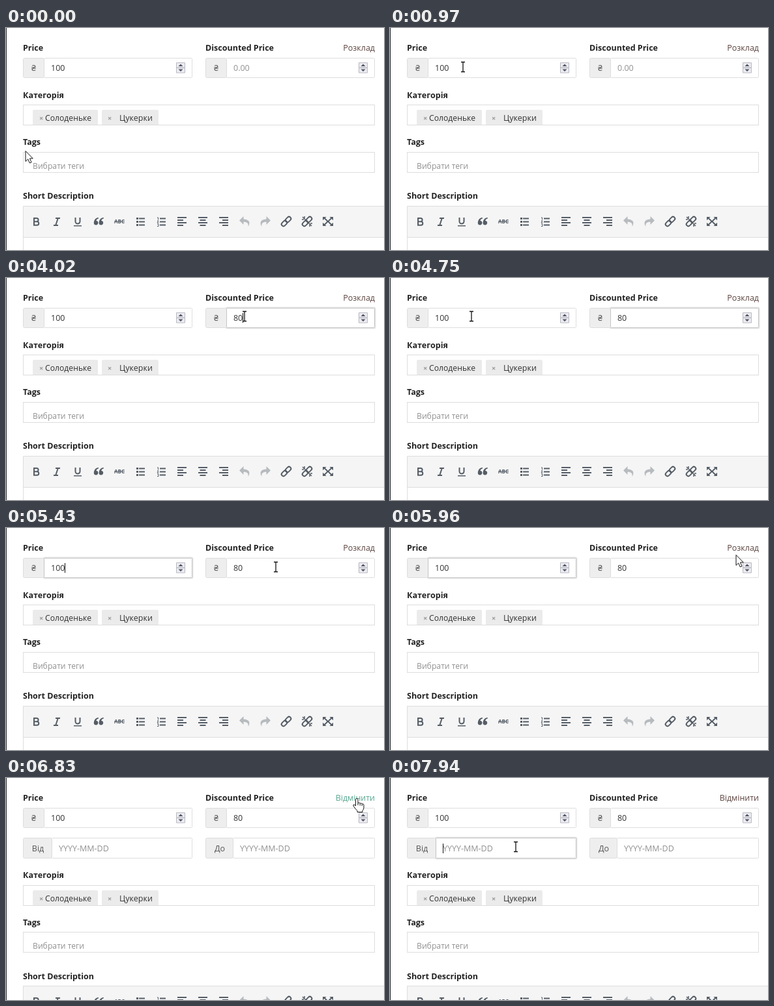
Recreate the animation shown at these times as an HTML page. Size 580 px wide and 342 px high, loop 8000 ms.

```html
<!DOCTYPE html>
<html lang="uk">
<head>
<meta charset="utf-8">
<title>Product price form</title>
<style>
html, body { margin: 0; width: 100%; height: 100%; overflow: hidden; background: #fff; }
svg { display: block; }
text { font: 12.5px "Open Sans", "Noto Sans", sans-serif; fill: #333; }
.label { font-weight: 700; fill: #222; }
.cyr { font-size: 12.2px; }
.hint { fill: #919191; }
.unit { fill: #555; text-anchor: middle; }
.link { text-anchor: end; fill: #5d4540; }
.x { font-size: 11px; font-weight: 700; fill: #999; }
.box { fill: #fff; stroke: #ddd; }
.addon { fill: #eee; stroke: #ddd; }
.glow { fill: none; stroke: #000; stroke-width: 4; stroke-opacity: .1; }
.ring { fill: none; stroke: #c4c4c4; }
.caret { fill: #111; }
.icon { fill: #555d66; }
.line { fill: none; stroke: #555d66; stroke-width: 2; }
.off { opacity: .38; }

/* every change is a hard cut on one 8 s clock */
.t { animation: 8s step-end infinite; }
.move { animation-name: move; }
.arrow { animation-name: arrow; }
.beam { animation-name: beam; }
.hand { animation-name: hand; }
.click { animation-name: click; }
.focus-price { animation-name: focus-price; }
.focus-sale { animation-name: focus-sale; }
.focus-from { animation-name: focus-from; }
.caret-price { animation-name: caret-price; }
.caret-sale { animation-name: caret-sale; }
.empty { animation-name: empty; }
.one { animation-name: one; }
.two { animation-name: two; }
.closed { animation-name: closed; }
.open { animation-name: open; }
.link.t { animation-name: link; }
.drop46 { animation-name: drop46; }
.drop47 { animation-name: drop47; }

@keyframes move {
  0% { transform: translate(30px, 190px); }
  5.125% { transform: translate(36px, 176px); }
  6.875% { transform: translate(50px, 143px); }
  8.625% { transform: translate(69px, 110px); }
  10.375% { transform: translate(90px, 83px); }
  12.125% { transform: translate(112px, 60px); }
  17.125% { transform: translate(160px, 60px); }
  18.875% { transform: translate(292px, 61px); }
  20.625% { transform: translate(352px, 60px); }
  22.375% { transform: translate(366px, 59px); }
  57.625% { transform: translate(230px, 59px); }
  59.375% { transform: translate(125px, 59px); }
  66.375% { transform: translate(255px, 60px); }
  67.875% { transform: translate(414px, 60px); }
  69.625% { transform: translate(463px, 60px); }
  71.25% { transform: translate(498px, 58px); }
  72.875% { transform: translate(520px, 52px); }
  74.5% { transform: translate(531px, 42px); }
  76.125% { transform: translate(536px, 35px); }
  77.875% { transform: translate(538px, 32px); }
  92.375% { transform: translate(462px, 54px); }
  94.125% { transform: translate(325px, 82px); }
  95.875% { transform: translate(232px, 102px); }
  97.5%, 100% { transform: translate(193px, 106px); }
}
@keyframes arrow {
  0%, 18.875%, 74.5%, 94.125% { opacity: 1; }
  12.125%, 20.625%, 76.125%, 95.875%, 100% { opacity: 0; }
}
@keyframes beam {
  0%, 18.875%, 74.5%, 94.125% { opacity: 0; }
  12.125%, 20.625%, 92.375%, 95.875%, 100% { opacity: 1; }
}
@keyframes hand {
  0%, 92.375%, 100% { opacity: 0; }
  76.125% { opacity: 1; }
}
@keyframes click {
  0%, 30.125%, 100% { opacity: 0; }
  28.25% { opacity: 1; }
}
@keyframes focus-sale {
  0%, 63%, 100% { opacity: 0; }
  30.125% { opacity: 1; }
}
@keyframes focus-price {
  0%, 83.625%, 100% { opacity: 0; }
  63% { opacity: 1; }
  81.75% { opacity: .4; }
}
@keyframes focus-from {
  0% { opacity: 0; }
  99.25%, 100% { opacity: 1; }
}
@keyframes caret-price {
  0%, 69.625%, 81.75%, 100% { opacity: 0; }
  63%, 76.125% { opacity: 1; }
}
@keyframes caret-sale {
  0%, 36.625%, 57.625%, 100% { opacity: 0; transform: none; }
  30.125%, 43.625% { opacity: 1; transform: none; }
  48.625% { opacity: 1; transform: translate(7px, 0); }
  50.25% { opacity: 1; transform: translate(14px, 0); }
}
@keyframes empty {
  0% { opacity: 1; }
  48.625%, 100% { opacity: 0; }
}
@keyframes one {
  0% { opacity: 0; }
  48.625%, 100% { opacity: 1; }
}
@keyframes two {
  0% { opacity: 0; }
  50.25%, 100% { opacity: 1; }
}
@keyframes closed {
  0% { opacity: 1; }
  85.375%, 100% { opacity: 0; }
}
@keyframes open {
  0% { opacity: 0; }
  85.375%, 100% { opacity: 1; }
}
@keyframes link {
  0%, 92.375%, 100% { fill: #5d4540; }
  76.125% { fill: #58a890; }
}
@keyframes drop46 {
  0% { transform: none; }
  85.375%, 100% { transform: translate(0, 46px); }
}
@keyframes drop47 {
  0% { transform: none; }
  85.375%, 100% { transform: translate(0, 47px); }
}
</style>
</head>
<body>
<svg width="580" height="342" viewBox="0 0 580 342">
  <defs>
    <g id="spin">
      <path d="M.5 .5h13v7.5h-13zM.5 8.5h13v7.5h-13z" fill="#ececf0" stroke="#b9b9c2"/>
      <path d="M3.5 6 7 2.5 10.500 6zM3.500 10.500h7L7 14z" fill="#4e5468"/>
    </g>
    <path id="quote" d="M142 292c-4.300 .4-7.200 3.800-7.200 8.300a3.300 3.300 0 1 0 3.600-3.400c.3-1.600 1.600-2.900 3.600-3.300z"/>
    <path id="undo" d="M358 296.500l6.500-6.500v4.500c8 0 11.500 5 7 11.500 1-5-1.500-7.200-7-7.200v4.200z"/>
    <g id="chain" transform="rotate(-45)">
      <rect x="-9" y="-3" width="9.500" height="6" rx="3"/>
      <rect x="-.5" y="-3" width="9.500" height="6" rx="3"/>
    </g>
    <path id="corner" d="M-8-7h5.500L-4.200-5.300-.5-1.700-2-.4-5.700-4-8-1.800z"/>
  </defs>

  <!-- prices -->
  <text class="label" x="26" y="35">Price</text>
  <text class="label" x="306" y="35">Discounted Price</text>
  <g class="t closed"><text class="link t" x="566" y="35">Розклад</text></g>
  <g class="t open"><text class="link t" x="566" y="35">Відмінити</text></g>

  <rect class="glow t focus-price" x="58.500" y="46.500" width="227" height="30" rx="1"/>
  <rect class="addon" x="26.500" y="46.500" width="32" height="30" rx="2"/>
  <rect class="box" x="58.500" y="46.500" width="227" height="30" rx="1"/>
  <rect class="ring t focus-price" x="58.500" y="46.500" width="227" height="30" rx="1"/>
  <text class="unit" x="42.500" y="66">₴</text>
  <text x="69" y="66">100</text>
  <rect class="caret t caret-price" x="90" y="54" width="1" height="15"/>
  <use href="#spin" x="261" y="53"/>

  <rect class="glow t focus-sale" x="338.500" y="46.500" width="227" height="30" rx="1"/>
  <rect class="addon" x="306.500" y="46.500" width="32" height="30" rx="2"/>
  <rect class="box" x="338.500" y="46.500" width="227" height="30" rx="1"/>
  <rect class="ring t focus-sale" x="338.500" y="46.500" width="227" height="30" rx="1"/>
  <text class="unit" x="322.500" y="66">₴</text>
  <text class="hint t empty" x="349" y="66">0.00</text>
  <text x="349" y="66"><tspan class="t">
  </tspan></text>
  <text class="t one" x="349" y="66">8</text>
  <text class="t two" x="356.100" y="66">0</text>
  <rect class="caret t caret-sale" x="349" y="54" width="1" height="15"/>
  <use href="#spin" x="541" y="53"/>

  <!-- schedule -->
  <g class="t open">
    <rect class="glow t focus-from" x="70.500" y="92.500" width="215" height="31" rx="1"/>
    <rect class="addon" x="26.500" y="92.500" width="44" height="31" rx="2"/>
    <rect class="box" x="70.500" y="92.500" width="215" height="31" rx="1"/>
    <rect class="ring t focus-from" x="70.500" y="92.500" width="215" height="31" rx="1"/>
    <text class="unit" x="49" y="113">Від</text>
    <text class="hint" x="81" y="113">YYYY-MM-DD</text>
    <rect class="caret t focus-from" x="81" y="101" width="1" height="15"/>
    <rect class="addon" x="306.500" y="92.500" width="42" height="31" rx="2"/>
    <rect class="box" x="348.500" y="92.500" width="217" height="31" rx="1"/>
    <text class="unit" x="328" y="113">До</text>
    <text class="hint" x="359" y="113">YYYY-MM-DD</text>
  </g>

  <!-- category and tags -->
  <g class="t drop46">
    <text class="label" x="26" y="108">Категорія</text>
    <rect class="box" x="26.500" y="191.500" width="539" height="31"/>
    <text class="hint cyr" x="41" y="217">Вибрати теги</text>
  </g>
  <g class="t drop47">
    <rect class="box" x="26.500" y="118.500" width="539" height="31"/>
    <path d="M41 149v-21q0-2 2-2h96q2 0 2 2v21zM147 149v-21q0-2 2-2h83q2 0 2 2v21z" fill="#ebebeb"/>
    <text class="x" x="51" y="143">×</text>
    <text class="cyr" x="60" y="143">Солоденьке</text>
    <text class="x" x="156" y="143">×</text>
    <text x="174" y="143">Цукерки</text>
    <text class="label" x="26" y="180">Tags</text>
    <text class="label" x="26" y="263">Short Description</text>
  </g>

  <!-- editor -->
  <g class="t drop46">
    <rect x="26" y="274" width="554" height="49" fill="#f5f5f5"/>
    <path d="M580 274.500H26.500V342M27 322.500h553" fill="none" stroke="#ddd"/>
    <path class="line" d="M43 293v11M42 293h5a2.500 2.500 0 0 1 0 5.200h-4h4.500a2.800 2.800 0 0 1 0 5.600H42"/>
    <path class="line" d="M76 293h7M73 304h7M79.800 293l-3.600 11"/>
    <path class="line" d="M106.500 292v6a3.500 3.500 0 0 0 7 0v-6"/>
    <path class="icon" d="M104 304h12v1.500h-12z"/>
    <g class="icon">
      <use href="#quote"/>
      <use href="#quote" x="7.800"/>
    </g>
    <text x="174" y="301" text-anchor="middle" style="font-size:8px;font-weight:700;fill:#555d66">ABC</text>
    <path class="icon" d="M166 297.500h16v1h-16z"/>
    <path class="line" d="M204 293.500h9M204 298.500h9M204 303.500h9M236 293.500h9M236 298.500h9M236 303.500h9" stroke-width="1.500"/>
    <path class="icon" d="M200 292h3v3h-3zM200 297h3v3h-3zM200 302h3v3h-3z"/>
    <path d="M232 292h1.500v3.500M232 297h2l-2 3h2.500M232 302h2v3.500h-2" fill="none" stroke="#555d66"/>
    <path class="line" d="M263 292h14M263 296h9M263 300h14M263 304h9"/>
    <path class="line" d="M295 292h14M297.500 296h9M295 300h14M297.500 304h9"/>
    <path class="line" d="M327 292h14M332 296h9M327 300h14M332 304h9"/>
    <g class="icon off">
      <use href="#undo"/>
      <use href="#undo" transform="translate(764 0) scale(-1 1)"/>
    </g>
    <g class="line">
      <use href="#chain" x="430" y="298"/>
      <use href="#chain" x="462" y="298"/>
      <path d="M455 291l14 14M458 290v3M454 295h3M466 306v-3M470 301h-3" stroke-width="1.500"/>
    </g>
    <g class="icon" transform="translate(494 298)">
      <use href="#corner"/>
      <use href="#corner" transform="scale(-1 1)"/>
      <use href="#corner" transform="scale(1 -1)"/>
      <use href="#corner" transform="scale(-1 -1)"/>
      <path d="M-2-1.500h4v3h-4z"/>
    </g>
  </g>

  <path d="M0 0h1v342H0z" fill="#2b2b2b"/>

  <!-- pointer -->
  <g class="t move">
    <circle class="t click" cy=".5" r="10" fill="#fff" fill-opacity=".6" stroke="#222"/>
    <path class="t arrow" d="M0-.5V15.500L3.700 12 6.300 18 9 16.900 6.500 11H11.300z" fill="#fff" stroke="#111"/>
    <path class="t beam" d="M-3-7.500h2.500l.5 .5 .5-.5H3M0-7V7M-3 7.500h2.500L0 7l.5 .5H3" fill="none" stroke="#111" stroke-width="1.300"/>
    <g class="t hand">
      <path d="M-1.500 1.500Q-1.500-.5 .3-.5T2 1.500V6.500q2.200-1.200 3.200 .6 2-.9 3 .8 2.500-.6 2.800 1.600v4.500q-.3 2.500-2 4.500v2H1v-2Q-2 15.500-5 11q-.6-1.800 1-2 1.500 .3 2.500 2z" fill="#fff" stroke="#111"/>
      <path d="M2 6.500v3.500M5.200 7.500v3M8.200 8.500v2.500" fill="none" stroke="#111"/>
    </g>
  </g>
</svg>
</body>
</html>
```
